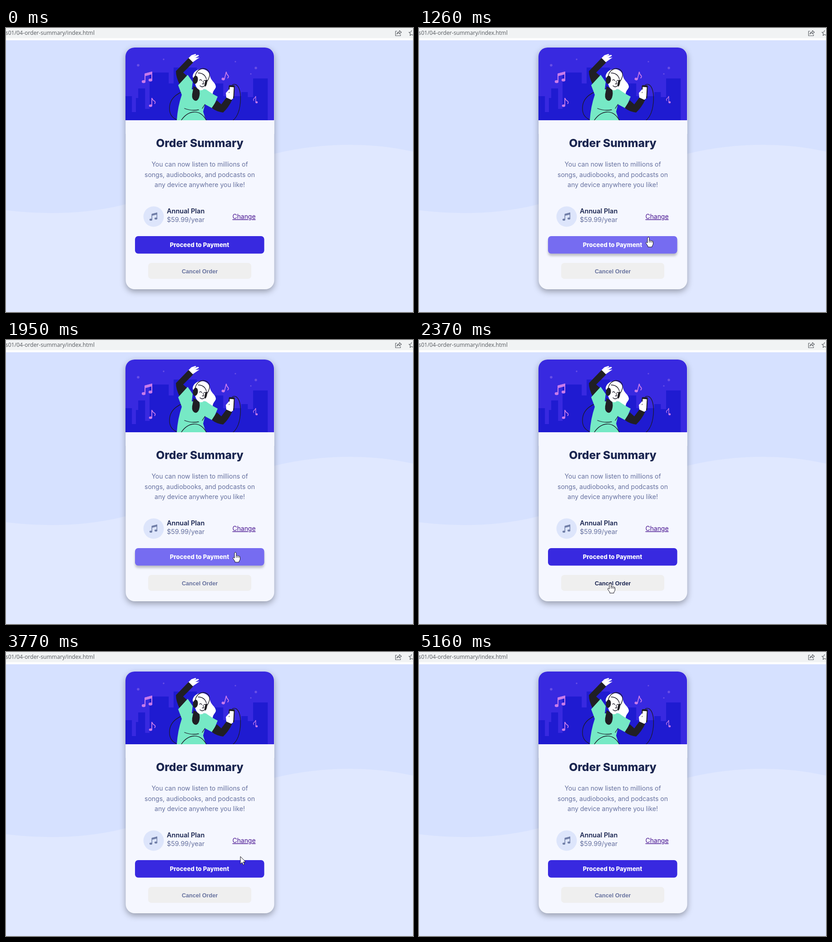
These frames come from a looping animation (896x625 px, 5620 ms). An HTML page:

```html
<!DOCTYPE html>
<html lang="en">
<head>
<meta charset="utf-8">
<title>Order Summary</title>
<style>
  html, body { margin: 0; width: 100%; height: 100%; overflow: hidden; }
  svg { display: block; width: 896px; height: 625px; }
  text { font-family: Inter, sans-serif; }
  .mid { text-anchor: middle; }
  .copy { font-size: 14px; fill: #66719f; }
  .ink { fill: none; stroke: #1c1a28; stroke-width: 1.3; stroke-linecap: round; }
  .dark { fill: #201f24; }
  #card { filter: drop-shadow(0 5px 7px rgba(0, 0, 0, .33)); }
  #change { font-size: 13.9px; fill: #45108f; text-decoration: underline; }
  #change.hover { fill: #6b5bef; text-decoration: none; }
  #proceed rect { fill: #3829e0; }
  #proceed.hover rect { fill: #766cf1; filter: drop-shadow(0 5px 2.5px rgba(0, 0, 0, .22)); }
  #cancel text { font: bold 12.6px "Liberation Sans", Arial, sans-serif; fill: #68739f; }
  #cancel.hover text { fill: #1a2450; }
</style>
</head>
<body>
<svg viewBox="0 0 896 625">
  <defs>
    <clipPath id="hero"><rect x="263" y="43" width="327" height="180" rx="20"/></clipPath>
    <g id="pair">
      <path d="M 7 21 V 4 L 22 0 V 17" fill="none" stroke="currentColor" stroke-width="2"/>
      <path d="M 7 3 L 22 -1 V 5 L 7 9 Z" fill="currentColor"/>
      <ellipse cx="4" cy="21" rx="4.2" ry="3.3" fill="currentColor"/>
      <ellipse cx="19" cy="17.5" rx="4.2" ry="3.3" fill="currentColor"/>
    </g>
    <g id="note">
      <path d="M 6 17 V 0 Q 8 5 12 7 Q 15 9 12 13" fill="none" stroke="currentColor" stroke-width="1.8"/>
      <ellipse cx="3.3" cy="17" rx="3.6" ry="2.8" fill="currentColor"/>
    </g>
  </defs>

  <rect width="896" height="625" fill="#d6e1ff"/>
  <path d="M 0 401 C 90 412 180 409 263 388 C 380 359 470 307 590 277 C 690 253 800 250 896 272 V 625 H 0 Z" fill="#e0e8ff"/>
  <rect width="896" height="27" fill="#fff"/>
  <rect width="896" height="22.5" fill="#f1f3f4"/>
  <text x="195" y="15" text-anchor="end" style="font: 12.2px 'Open Sans', sans-serif" fill="#55595e">s01/04-order-summary/index.html</text>
  <g fill="none" stroke="#5f6368" stroke-width="1.2" stroke-linejoin="round">
    <path d="M 861 7 H 857.5 V 17 H 868.5 V 14"/>
    <path d="M 860.5 13.5 Q 861.5 8.5 866 8.5 V 5.5 L 870.5 9.5 L 866 13 V 10.5 Q 862.5 10.5 860.5 13.5 Z"/>
    <path d="M 893 5 L 891.3 9 L 887 9.4 L 890.3 12.2 L 889.3 16.5 L 893 14.2 L 897 16.5"/>
  </g>

  <rect id="card" x="263.5" y="43" width="327" height="532" rx="20" fill="#f5f7ff"/>

  <g clip-path="url(#hero)">
    <rect x="263" y="43" width="327" height="160" fill="#3829e0"/>
    <g id="city" fill="#1f1bd1"></g>
    <g fill="#694fe6">
      <circle cx="291" cy="82" r="2.8"/>
      <circle cx="347" cy="69" r="1.7"/>
      <circle cx="505" cy="74" r="1.6"/>
      <circle cx="550" cy="88" r="2.7"/>
      <circle cx="539" cy="101" r="1.6"/>
    </g>
    <g color="#c97bea">
      <use href="#pair" transform="translate(299 97)"/>
      <use href="#note" transform="translate(479 95) rotate(14)"/>
      <use href="#note" transform="translate(315 154)"/>
      <use href="#note" transform="translate(554 150) scale(-.7 .8)"/>
    </g>

    <!-- raised arm -->
    <path class="ink" d="M 410 134 C 382 139 358 152 360 180 C 361 194 370 200 379 203"/>
    <path fill="#fff" d="M 401 67 L 408 60 L 417 57 L 419 59 L 413 62 L 423 59 L 425 61 L 417 66 L 426 65 L 410 76 Z"/>
    <path class="dark" d="M 402 66 L 412 76 L 390 98 L 400 107 L 383 126 Q 374 108 374 95 Z"/>
    <!-- hair, shirt, collar, face -->
    <path fill="#fff" d="M 411 108 C 411 88 444 83 449 105 C 451 117 462 120 462 130 C 460 136 455 138 455 146 C 446 147 440 141 436 134 Z"/>
    <path fill="#76e9c5" d="M 400 103 L 411 119 L 409 135 H 440 Q 454 145 466 151 L 455 177 L 438 168 L 434 184 L 440 203 H 376 Q 378 173 387 147 L 379 126 Z"/>
    <path class="dark" d="M 413 128 L 425 135 Q 428 143 425 153 Q 421 163 414 159 Q 407 154 411 140 Z"/>
    <path fill="#fff" d="M 415 112 Q 416 100 430 96 Q 443 102 442 119 Q 439 138 428 137 Q 416 134 415 112 Z"/>
    <g class="ink" stroke-width="1">
      <path d="M 416 108 Q 419 91 434 89 Q 449 91 448 105 Q 446 115 440 120"/>
      <path d="M 426 115 Q 429 112 431 116 M 436 116 Q 438 114 440 117"/>
      <path d="M 434 117 L 435 123 H 432 M 427 127 Q 432 132 437 127"/>
      <path d="M 423 99 Q 437 99 441 112 M 393 177 Q 408 183 424 180 M 438 168 L 432 177"/>
      <path d="M 386 203 C 400 182 426 176 441 203"/>
    </g>
    <ellipse class="dark" cx="417" cy="114" rx="5.5" ry="9" transform="rotate(8 417 114)"/>
    <ellipse class="dark" cx="440" cy="121" rx="2.5" ry="8" transform="rotate(12 440 121)"/>
    <!-- arm with phone -->
    <path class="dark" d="M 464 159 L 474 168 L 486 152 L 498 158 Q 490 175 478 186 Q 463 184 453 176 Z"/>
    <path class="ink" d="M 498 125 C 511 119 518 138 516 163 C 514 188 506 198 500 203"/>
    <g transform="rotate(3 496 140)">
      <rect class="dark" x="490" y="126" width="13" height="29" rx="2"/>
      <rect x="492" y="130" width="9" height="21" rx="1" fill="#fff"/>
    </g>
    <path fill="#fff" d="M 485 153 L 484 143 L 491 135 L 494 137 L 490 143 L 497 142 L 500 148 V 155 L 496 158 Z"/>
  </g>
  <rect x="263.5" y="203" width="327" height="30" fill="#f5f7ff"/>

  <text class="mid" x="426.5" y="262" font-size="24.6" font-weight="800" fill="#1b2650">Order Summary</text>
  <g class="mid copy">
    <text x="426.5" y="305">You can now listen to millions of</text>
    <text x="426.5" y="327.5">songs, audiobooks, and podcasts on</text>
    <text x="426.5" y="350">any device anywhere you like!</text>
  </g>

  <circle cx="325" cy="415" r="22.5" fill="#dde5fb"/>
  <use href="#pair" color="#717fa8" transform="translate(316 407) scale(.74 .7)"/>
  <text x="354" y="407.5" font-size="14.5" font-weight="600" fill="#1b2650">Annual Plan</text>
  <text class="copy" x="354" y="427" style="font-size: 14.4px">$59.99/year</text>
  <text id="change" x="498.5" y="420">Change</text>

  <g id="proceed">
    <rect x="284" y="458" width="284.5" height="38.5" rx="7"/>
    <text class="mid" x="426" y="482" font-size="13.2" font-weight="800" fill="#fff">Proceed to Payment</text>
  </g>
  <g id="cancel">
    <rect x="313" y="517" width="227" height="35" rx="7" fill="#efefef"/>
    <text class="mid" x="426.5" y="539.5">Cancel Order</text>
  </g>

  <g id="cursor" fill="#fff" stroke="#15131f" stroke-linejoin="round">
    <path id="arrow" d="M 0 0 V 16.5 L 3.8 13 L 6.3 18.5 L 8.8 17.4 L 6.4 12 H 11.5 Z"/>
    <g id="hand">
      <path d="M -2 13 V 2 Q 0 -2 2 2 V 8 Q 4 6 5 8.5 Q 7 7 8 9 Q 10 8 10.5 11 V 15 Q 10 18 8 20 V 22 H -1 V 20 L -5.5 13.5 Q -6 10 -2 13 Z"/>
      <path d="M 2 8 V 12 M 5 9 V 12 M 8 10 V 12.5" fill="none"/>
    </g>
  </g>
</svg>
<script>
const LOOP = 5620, TICK = 70, GONE = 5160;
const el = id => document.getElementById(id);

// Skyline blocks: left, top, width.
const blocks = [
  [263, 150, 14], [277, 185, 9], [286, 154, 5], [291, 133, 15], [306, 178, 10],
  [316, 98, 42], [358, 122, 11], [369, 87, 51], [420, 130, 40], [460, 122, 18],
  [478, 150, 40], [518, 141, 14], [532, 152, 12], [544, 111, 32],
];
el('city').innerHTML = blocks.map(([x, y, w]) =>
  `<rect x="${x}" y="${y}" width="${w + 0.2}" height="${203 - y}"/>`).join('');

// Pointer moves: start time, number of ticks, evenly spaced way points.
const moves = [
  [70, 7, [[848, 612], [520, 500], [450, 475]]],
  [710, 9, [[474, 506], [466, 532], [436, 532], [500, 451], [510, 468]]],
  [1330, 4, [[511, 460], [517, 413]]],
  [1740, 9, [[518, 428], [500, 480], [432, 532]]],
  [2370, 8, [[421, 535], [380, 527], [365, 448], [380, 340], [440, 251], [530, 290], [582, 365], [599, 436]]],
  [2940, 8, [[596, 450], [535, 478], [490, 465], [517, 413]]],
  [3630, 9, [[520, 430], [516, 450], [505, 476], [488, 490], [470, 515]]],
  [4250, 9, [[466, 524], [456, 536], [450, 544], [600, 560], [762, 590]]],
  [4880, 4, [[774, 598], [813, 622]]],
];

// Hover areas: left, top, right, bottom.
const areas = {
  change: [499, 407, 550, 424],
  proceed: [284, 458, 568, 496],
  cancel: [313, 521, 540, 552],
};

const show = (id, on) => { el(id).style.display = on ? '' : 'none'; };

function pointerAt(time) {
  const move = moves.filter(m => time >= m[0]).pop();
  if (!move || time >= GONE) return null;
  const [start, ticks, points] = move;
  const tick = Math.min(Math.floor((time - start) / TICK), ticks - 1);
  const place = tick / (ticks - 1) * (points.length - 1);
  const i = Math.min(Math.floor(place), points.length - 2);
  return points[i].map((v, axis) => v + (points[i + 1][axis] - v) * (place - i));
}

function draw() {
  const pointer = pointerAt(performance.now() % LOOP);
  const [x, y] = pointer || [-99, -99];
  let over = false;
  for (const [id, [left, top, right, bottom]] of Object.entries(areas)) {
    const inside = x >= left && x <= right && y >= top && y <= bottom;
    el(id).classList.toggle('hover', inside);
    over = over || inside;
  }
  show('cursor', pointer);
  show('hand', over);
  show('arrow', !over);
  el('cursor').setAttribute('transform', `translate(${Math.round(x)} ${Math.round(y)})`);
  requestAnimationFrame(draw);
}
draw();
</script>
</body>
</html>
```
